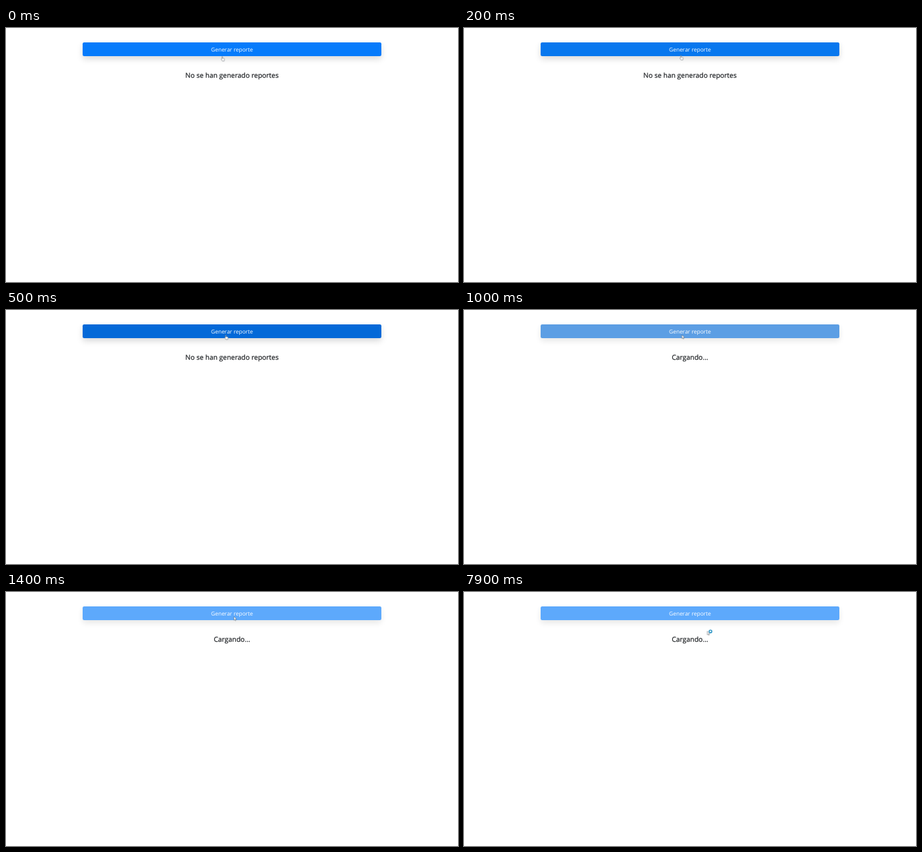
An HTML page for the animation above (8 s loop, 690x388 px).

```html
<!DOCTYPE html>
<html lang="es">
<head>
<meta charset="utf-8">
<title>Generar reporte</title>
<style>
html, body { margin: 0; width: 100%; height: 100%; overflow: hidden; background: #fff; }
.bar {
  position: absolute; left: 117.3px; top: 21.6px; width: 455.4px; height: 21.6px;
  border-radius: 2.3px; box-shadow: 0 4.6px 9.2px rgba(0, 0, 0, .15);
  animation: press 8s step-end infinite;
}
svg { position: absolute; left: 0; top: 0; }
text {
  font-family: "Open Sans", "Noto Sans", sans-serif;
  text-anchor: middle; text-rendering: geometricPrecision;
}
.label { font-size: 8.45px; fill: #fff; }
.status { font-size: 10.45px; fill: #1b1e21; stroke: #1b1e21; stroke-width: .22px; }
.cursor { fill: #fff; stroke: #50565c; stroke-width: .5px; stroke-linejoin: round; }
.idle, .hand, .arrow, .loading, .busy { animation: 8s step-end infinite; }
.idle { animation-name: before; }
.loading { animation-name: after; }
.hand { animation-name: before, hover; }
.arrow { animation-name: after, leave; }
.busy { animation-name: wait; }

@keyframes press {
  0% { background: #067bfb; opacity: 1; }
  2.5% { background: #0777ee; opacity: 1; }
  3.75% { background: #066ddd; opacity: 1; }
  5% { background: #0469d8; opacity: 1; }
  12.5% { background: #0469d5; opacity: .65; }
  13.75% { background: #0573ea; opacity: .65; }
  15%, 100% { background: #067bfb; opacity: .65; }
}
@keyframes before { 0% { visibility: visible; } 12.5%, 100% { visibility: hidden; } }
@keyframes after { 0% { visibility: hidden; } 12.5%, 100% { visibility: visible; } }
@keyframes wait { 0% { visibility: hidden; } 98.75%, 100% { visibility: visible; } }
@keyframes hover {
  0% { transform: translate(328.2px, 43.3px); }
  1.25% { transform: translate(328.7px, 42.5px); }
  2.5% { transform: translate(329.2px, 41.6px); }
  3.75% { transform: translate(331.2px, 40px); }
  5% { transform: translate(332.8px, 38.6px); }
  6.25%, 100% { transform: translate(333.6px, 37.8px); }
}
@keyframes leave {
  0% { transform: translate(332.6px, 38px); }
  17.5% { transform: translate(348px, 37.5px); }
  18.75% { transform: translate(361.5px, 39.7px); }
  23.75% { transform: translate(367px, 48px); }
  25% { transform: translate(371.2px, 56.8px); }
  98.75%, 100% { transform: translate(371.4px, 59.8px); }
}
</style>
</head>
<body>
<div class="bar"></div>
<svg width="690" height="388" viewBox="0 0 690 388">
  <text class="label" x="345" y="36.1">Generar reporte</text>
  <g class="status">
    <text class="idle" x="345" y="75.8">No se han generado reportes</text>
    <text class="loading" x="345" y="75.8">Cargando...</text>
  </g>
  <g class="cursor">
    <path class="hand" d="M1.4 4V.8Q1.4.2 1.9.2T2.4.8V2.9L4.6 3.3Q5.4 3.5 5.4 4.3L4.9 7.2H2L.4 4.7Q.2 4 .8 4Z"/>
    <path class="arrow" d="M0 0V5.6L1.3 4.4 2.1 6.3 3 5.9 2.2 4.1H4Z"/>
  </g>
  <circle class="busy" cx="376.3" cy="60.2" r="2.1" fill="#d5eef8" stroke="#2a93c4" stroke-width="1.4"/>
</svg>
</body>
</html>
```
